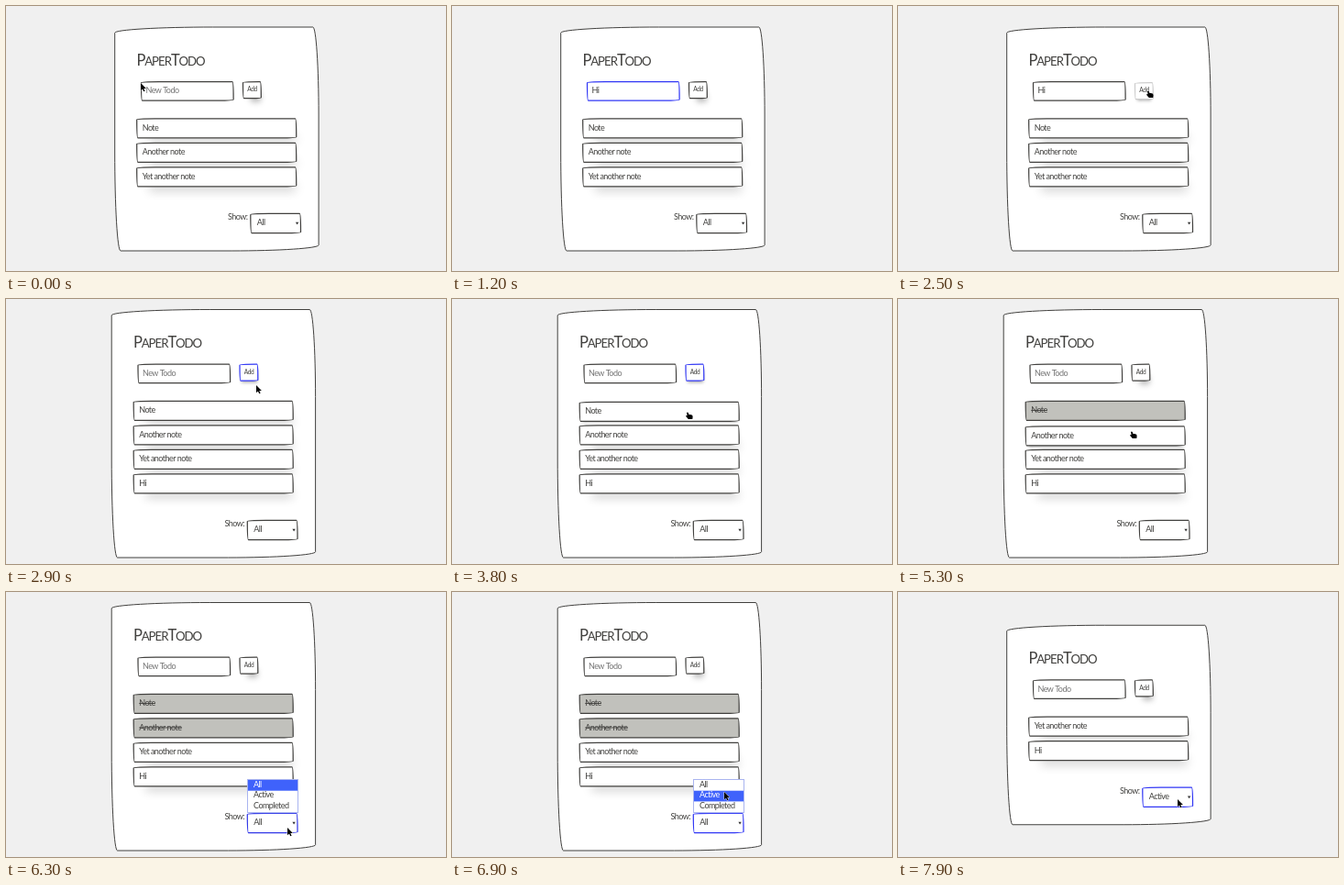
Write an HTML page with a canvas that moves like this. It is 480 px wide and 289 px high and loops after 8 s.

```html
<!DOCTYPE html>
<html lang="en">
<head>
<meta charset="utf-8">
<title>Paper todo list</title>
<style>
html, body { margin: 0; width: 100%; height: 100%; overflow: hidden; background: #f0f0f0; }
canvas { display: block; }
</style>
</head>
<body>
<canvas id="stage" width="480" height="289"></canvas>
<script>
const LOOP = 8000, STEP = 100, FADE = 235, PITCH = 26.5;
const INK = [65, 64, 62], BLUE = [48, 54, 245], PALE = [204, 204, 204];

// Paper shadows: one while resting, one while hovered
const RAISED = { x: 6.3, y: 11.8, blur: 10.5, spread: -7.6, alpha: .22 };
const NEAR = { x: .8, y: 3.4, blur: 3.4, spread: -2.1, alpha: .35 };
const BTN_RAISED = { x: 4, y: 8.5, blur: 6, spread: -5, alpha: .28 };

// hover: enter and leave times; done: time it is ticked off
const items = [
  { text: 'Note', hover: [3350, 4800], done: 4800 },
  { text: 'Another note', hover: [5060, 5400], done: 5400 },
  { text: 'Yet another note', hover: [5660, 5800], done: Infinity },
  { text: 'Hi', hover: [5820, 5920], done: Infinity }
];

// Pointer moves: start, end, destination
const moves = [
  [0, 200, 160, 92.5],
  [1700, 2300, 273, 94],
  [3000, 3800, 257, 125],
  [4900, 5300, 255, 146],
  [5500, 6100, 310, 270],
  [6100, 6300, 307, 257],
  [6400, 6900, 297, 218],
  [7200, 7500, 305, 247],
  [7600, 7900, 305, 226]
];

const ARROW = new Path2D('M0 0V8.2L1.9 6.5 3.2 9.3 4.6 8.7 3.3 5.9H5.9Z');
const HAND = new Path2D('M-1 -1Q0 -2 .9 -.8L1.4 1Q3.5 .6 5.2 1.8 6 3 5.3 6H.8L-1.8 3Q-2 1.8-.4 2.2Z');
const BEAM = new Path2D('M-1.5 -4.5H1.5M0 -4.5V4.5M-1.5 4.5H1.5');

const ctx = document.getElementById('stage').getContext('2d');
const clamp = v => Math.min(1, Math.max(0, v));
const mix = (a, b, k) => a + (b - a) * k;
const mixAll = (a, b, k) => a.map((v, i) => mix(v, b[i], k));
const smooth = k => k * k * (3 - 2 * k);
const easeOut = k => 1 - (1 - clamp(k)) ** 2.5;
const fade = (t, on, off = Infinity) => easeOut((t - on) / FADE) - easeOut((t - off) / FADE);
const within = (t, a, b) => t >= a && t < b;
const rgb = c => `rgb(${c.map(Math.round)})`;
const mixShadow = (a, b, k) =>
  Object.fromEntries(Object.keys(a).map(key => [key, mix(a[key], b[key], k)]));

function outline(x, y, w, h) {
  const s = 6.3, l = 107, m = 95;
  ctx.beginPath();
  ctx.roundRect(x, y, w, h, [{ x: l, y: s }, { x: s, y: m }, { x: m, y: s }, { x: s, y: l }]);
}

function castShadow(x, y, w, h, s) {
  const far = 1000;
  ctx.save();
  ctx.shadowColor = `rgba(0,0,0,${s.alpha})`;
  ctx.shadowBlur = s.blur;
  ctx.shadowOffsetX = far + s.x;
  ctx.shadowOffsetY = s.y;
  ctx.fillStyle = '#000';
  ctx.fillRect(x - far - s.spread, y - s.spread, w + 2 * s.spread, h + 2 * s.spread);
  ctx.restore();
}

function paper(x, y, w, h, { border = INK, fill = '#fff', shadow, line = 1.25 } = {}) {
  if (shadow) castShadow(x, y, w, h, shadow);
  outline(x + .5, y + .5, w - 1, h - 1);
  ctx.fillStyle = fill;
  ctx.fill();
  ctx.strokeStyle = rgb(border);
  ctx.lineWidth = line;
  ctx.stroke();
}

// Returns the width, so that runs can follow each other
function write(str, x, y, { size = 9, color = rgb(INK), tight = .06 } = {}) {
  ctx.font = `${size}px Lato, sans-serif`;
  ctx.letterSpacing = -tight * size + 'px';
  ctx.fillStyle = color;
  ctx.fillText(str, x, y);
  return ctx.measureText(str).width;
}

function drawTitle(x, y) {
  for (const run of ['P', 'APER', 'T', 'ODO'])
    x += write(run, x, y, { size: run.length > 1 ? 13.2 : 16.5, tight: .075 });
}

function drawItem(item, x, y, t) {
  const k = fade(t, ...item.hover), ticked = t >= item.done;
  y += k;
  paper(x, y, 175, 22, {
    fill: ticked ? '#c1c1bc' : '#fff',
    shadow: ticked ? null : mixShadow(RAISED, NEAR, k)
  });
  const width = write(item.text, x + 6.5, y + 13.5);
  if (ticked) ctx.fillRect(x + 6.5, y + 10.2, width, .9);
}

function drawMenu(x, y, t) {
  const row = 11.7, picked = t < 6700 ? 0 : t < 6800 ? 2 : 1;
  ctx.fillStyle = '#fff';
  ctx.fillRect(x, y, 56, 3 * row + 1);
  ['All', 'Active', 'Completed'].forEach((text, i) => {
    const top = y + .5 + i * row;
    ctx.fillStyle = '#3f62fb';
    if (i === picked) ctx.fillRect(x, top, 56, row);
    write(text, x + 7, top + 7.5, { color: i === picked ? '#fff' : rgb(INK) });
  });
  ctx.strokeStyle = '#a9b4f0';
  ctx.lineWidth = 1;
  ctx.strokeRect(x + .5, y, 55, 3 * row + 1);
}

function drawSelect(x, y, t) {
  paper(x, y, 55.7, 22.3, { border: mixAll(INK, BLUE, fade(t, 6150)) });
  write(t < 7200 ? 'All' : 'Active', x + 7.5, y + 13.3);
  ctx.fillStyle = '#333';
  ctx.beginPath();
  ctx.moveTo(x + 49.6, y + 10);
  ctx.lineTo(x + 53, y + 10);
  ctx.lineTo(x + 51.3, y + 12.6);
  ctx.fill();
}

function drawPointer(t) {
  if (within(t, 900, 1800)) return;
  let at = [147, 84];
  for (const [from, to, ...end] of moves)
    at = mixAll(at, end, smooth(clamp((t - from) / (to - from))));
  const typing = within(t, 200, 900) || within(t, 1800, 2100);
  const pressing = within(t, 2200, 2600) || within(t, 3400, 5900);
  const shape = pressing ? HAND : ARROW;
  ctx.save();
  ctx.translate(...at);
  ctx.lineWidth = .8;
  ctx.strokeStyle = typing ? '#333' : '#fff';
  ctx.fillStyle = '#000';
  ctx.stroke(typing ? BEAM : shape);
  if (!typing) ctx.fill(shape);
  ctx.restore();
}

function draw(t) {
  const long = within(t, 2600, 7200), filtered = t >= 7200;
  const dx = long ? -3.5 : 0, dy = long ? -11.5 : filtered ? PITCH / 2 : 0;
  const shown = items.filter((_, i) => filtered ? i > 1 : i < 3 || long);
  const extra = (shown.length - 3) * PITCH;

  ctx.fillStyle = '#f0f0f0';
  ctx.fillRect(0, 0, 480, 289);
  ctx.save();
  ctx.translate(dx, dy);
  paper(118.2, 22.5, 223.4, 245 + extra, { line: 1 });
  drawTitle(142.5, 64.5);

  const typed = within(t, 900, 2600);
  paper(147, 82, 101.6, 21.7, { border: mixAll(INK, BLUE, fade(t, 150, 2265)) });
  write(typed ? (t < 1200 ? 'H' : 'Hi') : 'New Todo', 152.5, 95.3, { color: typed ? rgb(INK) : '#757575' });

  const over = fade(t, 2150, 2600), focus = fade(t, 2550, 4760);
  paper(258, 82 + over, 20.8, 19.2, {
    border: within(t, 2500, 2600) ? PALE : mixAll(INK, BLUE, focus),
    shadow: mixShadow(BTN_RAISED, NEAR, Math.max(over, focus))
  });
  write('Add', 263.2, 93.3 + over, { size: 6.6 });

  // The hovered item lies above the others
  const rows = shown.map((item, i) => ({ item, y: 122.3 + i * PITCH, k: fade(t, ...item.hover) }));
  rows.sort((a, b) => (a.k > .01) - (b.k > .01) || a.y - b.y);
  for (const { item, y } of rows) drawItem(item, 142.2, y, t);

  write('Show:', 242, 233 + extra);
  drawSelect(266.3, 225.8 + extra, t);
  if (within(t, 6300, 7200)) drawMenu(266.5, 189.5 + extra, t);
  ctx.restore();
  drawPointer(t);
}

const start = performance.now();
function tick() {
  const t = (performance.now() - start) % LOOP;
  draw(Math.floor(t / STEP) * STEP);
  requestAnimationFrame(tick);
}
tick();
</script>
</body>
</html>
```
